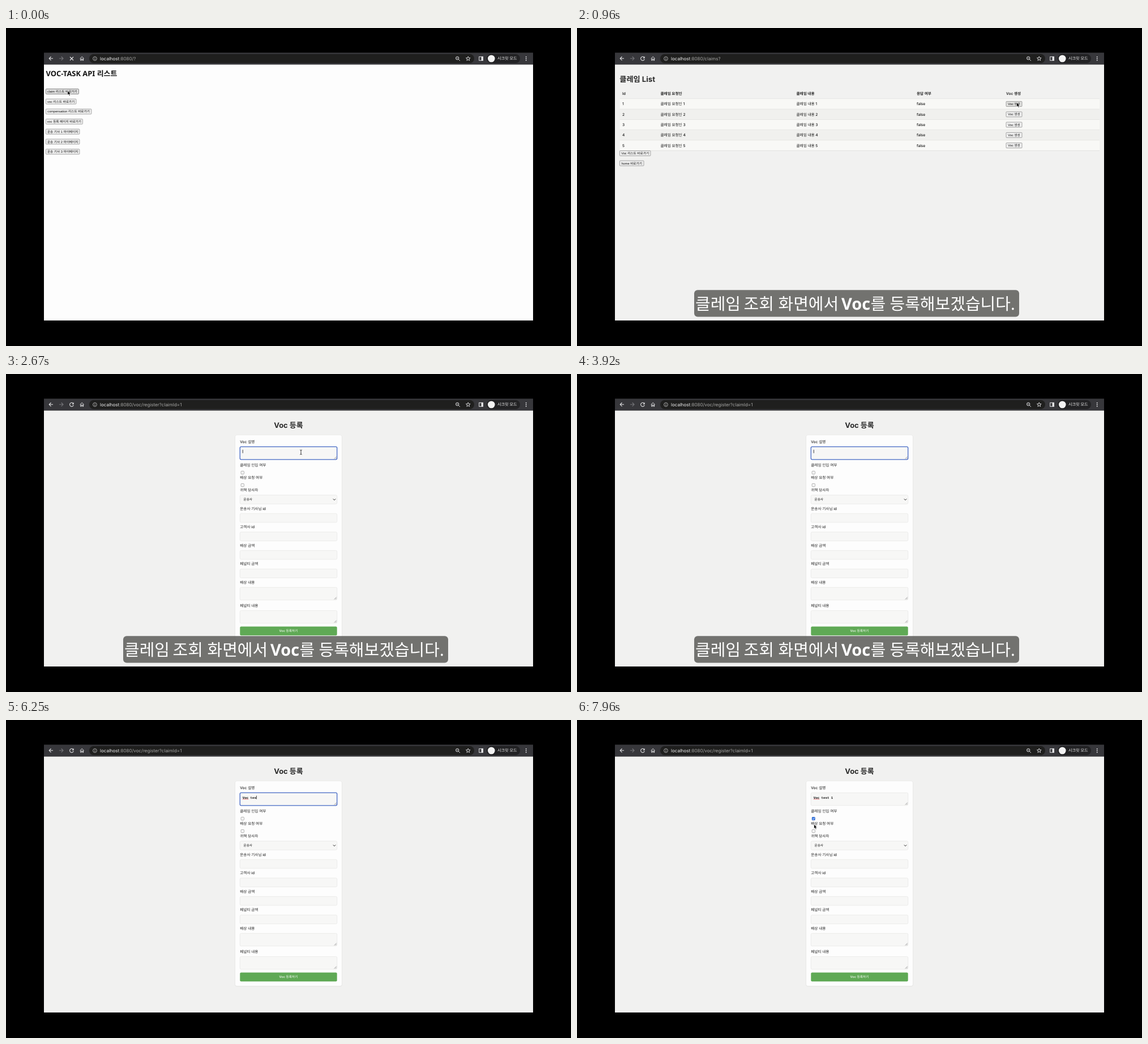
Animation of 998x561 px, one loop 8 s. Source, as an HTML page:

```html
<!DOCTYPE html>
<html lang="ko">
<head>
<meta charset="utf-8">
<title>Voc 등록</title>
<style>
  html, body { margin: 0; width: 100%; height: 100%; overflow: hidden; background: #000; }
  svg { display: block; width: 100%; height: 100%; }
  text { font-family: Inter, "Noto Sans CJK KR", "Noto Sans CJK", sans-serif; text-rendering: geometricPrecision; white-space: pre; }
  .mono { font-family: "Liberation Mono", "DejaVu Sans Mono", monospace; }
  .human { font-family: "Noto Sans", "Noto Sans CJK KR", "Noto Sans CJK", sans-serif; }
  .arial { font-family: "Liberation Sans", "Noto Sans CJK KR", "Noto Sans CJK", sans-serif; }
</style>
</head>
<body>
<svg id="stage" viewBox="0 0 998 561"></svg>
<script>
const LOOP = 8000;
const stage = document.getElementById('stage');

function add(parent, tag, attrs, content) {
  const el = document.createElementNS('http://www.w3.org/2000/svg', tag);
  for (const k in attrs) el.setAttribute(k, attrs[k]);
  if (content !== undefined) el.textContent = content;
  parent.appendChild(el);
  return el;
}
const group = (parent = stage) => add(parent, 'g', {});
const rect = (p, x, y, width, height, fill, more) =>
  add(p, 'rect', { x, y, width, height, fill, ...more });
const line = (p, d, stroke, width = 1, more) =>
  add(p, 'path', { d, stroke, 'stroke-width': width, fill: 'none', ...more });
const circle = (p, cx, cy, r, fill, more) => add(p, 'circle', { cx, cy, r, fill, ...more });
// Text is placed by its left edge and vertical centre.
const text = (p, x, cy, str, size, fill = '#222', more) =>
  add(p, 'text', { x, y: cy + size * 0.37, 'font-size': size, fill, ...more }, str);
const show = (el, on) => el.setAttribute('visibility', on ? 'inherit' : 'hidden');

function button(p, x, cy, width, label) {
  const box = rect(p, x, cy - 4.5, width, 9, '#efefef', { stroke: '#858585', 'stroke-width': 0.7, rx: 1 });
  text(p, x + width / 2, cy, label, 5.65, '#111', { class: 'arial', 'text-anchor': 'middle' });
  return box;
}

function buildToolbar() {
  const g = group();
  const ink = '#e4e4e6';
  rect(g, 67, 43.5, 864, 21, '#37373b');
  rect(g, 147, 46, 680, 16, '#1f1f1e', { rx: 8 });
  rect(g, 849, 46, 59, 16, '#222224', { rx: 8 });
  line(g, 'M83 53.8H76.5M79.5 50.5L76.2 53.8L79.5 57.1', ink, 1.1);
  line(g, 'M94 53.8H100.7M97.7 50.5L101 53.8L97.7 57.1', '#77777b', 1.1);
  line(g, 'M130.7 54L134.2 50.6L137.7 54M131.8 53.5V57.2H133.2V54.8H135.2V57.2H136.6V53.5', ink, 1);
  circle(g, 157, 54, 3.4, 'none', { stroke: '#c8c8c8', 'stroke-width': 0.8 });
  line(g, 'M157 53.6V56M157 51.8V52.7', '#c8c8c8', 0.9);
  circle(g, 797.2, 53.2, 2.7, 'none', { stroke: ink, 'stroke-width': 1 });
  line(g, 'M799.2 55.2L802 58M796 53.2H798.4', ink, 0.9);
  const star = [...Array(10).keys()].map(i => {
    const r = i % 2 ? 1.7 : 4, a = i * Math.PI / 5;
    return `${816.3 + r * Math.sin(a)} ${54.1 - r * Math.cos(a)}`;
  });
  line(g, `M${star.join('L')}Z`, ink, 0.9);
  rect(g, 835.7, 50.7, 6.8, 6.6, 'none', { stroke: ink, 'stroke-width': 1 });
  rect(g, 839.5, 50.7, 3, 6.6, ink);
  circle(g, 857.3, 54, 6.3, '#f3f3f3');
  text(g, 868, 53.8, '시크릿 모드', 7.1, '#f2f2f2', { 'font-weight': 500 });
  for (const y of [51, 54, 57]) circle(g, 918.7, y, 0.9, ink);

  const reload = group(g);
  line(reload, 'M118.6 51.7A3.4 3.4 0 1 0 119.3 54.8', ink, 1.1);
  add(reload, 'path', { d: 'M119.7 50V53.4H116.3Z', fill: ink });
  const stop = line(g, 'M113 51L119 57M119 51L113 57', ink, 1.2);

  const address = text(g, 166, 53.7, '', 8, '#f0f0f0');
  add(address, 'tspan', {}, 'localhost');
  const path = add(address, 'tspan', { fill: '#a9a9a7' });
  return { reload, stop, path };
}

function buildHome() {
  const g = group();
  rect(g, 67, 64.5, 864, 451.5, '#fdfdfd');
  text(g, 70.5, 80.7, 'VOC-TASK API 리스트', 12.9, '#111', { class: 'human', 'font-weight': 700 });
  const links = [
    ['claim 리스트 바로가기', 58], ['voc 리스트 바로가기', 53.5],
    ['compensation 리스트 바로가기', 80.5], ['voc 등록 페이지 바로가기', 65],
    ...[1, 2, 3].map(n => [`운송 기사 ${n} 마이페이지`, 59.5]),
  ];
  links.forEach(([label, w], i) => {
    const box = button(g, 70.4, 112 + i * 17.7, w, label);
    if (!i) { box.setAttribute('fill', '#e2e2e2'); box.setAttribute('stroke', '#555'); }
  });
  return g;
}

function buildClaims() {
  const g = group();
  const bold = { 'font-weight': 600 };
  let first;
  rect(g, 67, 64.5, 864, 451.5, '#f1f1f0');
  text(g, 75.3, 90, '클레임 List', 13.2, '#292929', { 'font-weight': 700 });
  [[80, 'Id'], [147.5, '클레임 요청인'], [387.5, '클레임 내용'], [600, '응답 여부'], [758, 'Voc 생성']]
    .forEach(([x, label]) => text(g, x, 116, label, 6.6, '#222', bold));
  line(g, 'M75.5 125H923', '#d9d9d7', 0.7);
  for (let n = 1; n <= 5; n++) {
    const y = 134 + (n - 1) * 18.3;
    rect(g, 75.5, y - 8.8, 847.5, 18, n % 2 ? '#f8f8f6' : '#f0f0ee');
    line(g, `M75.5 ${y + 9.2}H923`, '#d9d9d7', 0.7);
    [[80, n], [147.5, `클레임 요청인 ${n}`], [387.5, `클레임 내용 ${n}`], [600, 'false']]
      .forEach(([x, str]) => text(g, x, y, str, 6.6, '#151515', { 'font-weight': 500 }));
    const box = button(g, 758, y, 28, 'Voc 생성');
    first = first || box;
  }
  button(g, 75.4, 221, 54.5, 'Voc 리스트 바로가기');
  button(g, 75.4, 238.6, 42.6, 'home 바로가기');
  return { g, first };
}

function buildForm() {
  const g = group();
  rect(g, 67, 64.5, 864, 451.5, '#f1f1f0');
  text(g, 499, 90, 'Voc 등록', 13, '#292929', { 'font-weight': 700, 'text-anchor': 'middle' });
  rect(g, 404, 107.5, 190, 363, '#e9e9e7', { rx: 4 });
  rect(g, 405, 108, 188, 361, '#fdfdfd', { rx: 3 });

  const labels = [
    ['Voc 설명', 119.7], ['클레임 인입 여부', 160.5], ['배상 요청 여부', 182.5], ['귀책 당사자', 204.5],
    ['운송사 기사님 id', 237.5], ['고객사 id', 270], ['배상 금액', 302.5], ['페널티 금액', 335],
    ['배상 내용', 367.5], ['페널티 내용', 408.5],
  ];
  for (const [label, y] of labels) text(g, 413.3, y, label, 6.6, '#222', { 'font-weight': 450 });

  const field = (y, h) =>
    rect(g, 413.3, y, 171.4, h, '#f7f7f6', { rx: 2, stroke: '#e6e6e4', 'stroke-width': 0.7 });
  const area = y => {
    const box = field(y, 22.4);
    line(g, `M579.8 ${y + 21.2}L583.8 ${y + 17.2}M582 ${y + 21.2}L583.8 ${y + 19.4}`, '#666', 0.6);
    return box;
  };
  const note = area(128.4);
  [246.2, 278.8, 311.4, 344].forEach(y => field(y, 15.6));
  area(376.4);
  area(417.4);
  field(213.6, 15.6);
  text(g, 419.5, 221.3, '운송사', 5.6, '#111', { 'font-weight': 500 });
  line(g, 'M577.8 220.3L580 222.5L582.2 220.3', '#222', 1);
  const checkbox = y =>
    rect(g, 415.2, y - 2.6, 5.2, 5.2, '#fff', { rx: 1, stroke: '#777', 'stroke-width': 0.6 });
  checkbox(174);
  checkbox(196);
  const tick = group(g);
  rect(tick, 415, 171.3, 5.5, 5.5, '#2c6fe0', { rx: 1 });
  line(tick, 'M416.2 174.1L417.4 175.4L419.4 172.7', '#fff', 0.9);

  rect(g, 413.3, 445.6, 171.4, 15.6, '#5fa955', { rx: 2 });
  text(g, 499, 453.3, 'Voc 등록하기', 5.7, '#fff', { 'font-weight': 500, 'text-anchor': 'middle' });

  const typed = text(g, 417.8, 136.5, '', 5.75, '#111', { class: 'mono', 'font-weight': 700 });
  const spell = line(g, 'M418 139.7H428', '#d8343a', 0.9, { 'stroke-dasharray': '1.2 0.6' });
  const caret = rect(g, 417.8, 133.6, 0.8, 6, '#111');
  return { g, note, tick, typed, spell, caret };
}

function buildSubtitle() {
  const g = group();
  rect(g, 207, 462.2, 574, 47.3, '#5a5a58', { rx: 6, 'fill-opacity': 0.84 });
  const words = [[209, '클레임'], [294.5, '조회'], [355.5, '화면에서'], [467, 'Voc'], [518.5, '를'], [552.5, '등록해보겠습니다.']];
  for (const [x, word] of words) {
    const latin = word === 'Voc';
    text(g, x, 486.3, word, 29, '#fff', { class: 'human', 'font-weight': latin ? 700 : 500 });
  }
  return g;
}

const bar = buildToolbar();
const home = buildHome();
const claims = buildClaims();
const form = buildForm();
const subtitle = buildSubtitle();

const pointer = group();
const arrow = add(pointer, 'path', {
  d: 'M0 0V7.8L1.8 6.2L3 9L4.5 8.4L3.3 5.7H5.7Z', fill: '#000', stroke: '#fff', 'stroke-width': 0.7,
});
const beam = group(pointer);
line(beam, 'M-1.8 -4Q0 -4 0 -3V3Q0 4 1.8 4M1.8 -4Q0 -4 0 -3M0 3Q0 4 -1.8 4', '#222', 0.9);

const T = { claims: 160, subtitle: 400, load: 1200, form: 1400, focus: 2450, hide: 3200, end: 4130, back: 6950, check: 7540 };
const path = [
  [0, 108.8, 110.5], [260, 108.8, 110.5], [860, 776.6, 131.3], [1640, 776.6, 131.3],
  [2300, 521, 138], [6950, 521, 138], [7400, 417.5, 173.5], [7620, 417.5, 173.5], [7900, 418.6, 184],
];
const keys = [4500, 4660, 4850, 5400, 5750, 5950, 6150, 6360, 6520, 6700];
const NOTE = 'Voc test 1';

function pointerAt(t) {
  const i = path.findIndex(p => p[0] > t);
  if (i < 0) return path[path.length - 1].slice(1);
  const [t0, x0, y0] = path[i - 1], [t1, x1, y1] = path[i];
  const u = (t - t0) / (t1 - t0), e = u * u * (3 - 2 * u);
  return [x0 + (x1 - x0) * e, y0 + (y1 - y0) * e];
}

function draw(t) {
  const onForm = t >= T.form, onClaims = t >= T.claims && !onForm;
  show(home, t < T.claims);
  show(claims.g, onClaims);
  show(form.g, onForm);
  show(subtitle, t >= T.subtitle && t < T.end);

  const loading = t < T.claims || (t >= T.load && t < T.form);
  show(bar.stop, loading);
  show(bar.reload, !loading);
  bar.path.textContent = ':8080/' + (onForm ? 'voc/register?claimId=1' : onClaims ? 'claims?' : '?');

  const [x, y] = pointerAt(t);
  const overNote = onForm && x > 413 && x < 585 && y > 128 && y < 151;
  pointer.setAttribute('transform', `translate(${x} ${y})`);
  show(pointer, t < T.hide || t >= T.back);
  show(arrow, !overNote);
  show(beam, overNote);
  claims.first.setAttribute('fill', x > 758 ? '#dfdfdd' : '#efefef');

  const count = keys.filter(k => k <= t).length;
  const focused = t >= T.focus && t < T.check;
  const since = t - (count ? keys[count - 1] : T.focus);
  form.typed.textContent = NOTE.slice(0, count);
  form.caret.setAttribute('x', 417.8 + count * 3.45);
  show(form.caret, focused && since % 1000 < 500);
  show(form.spell, count > 3);
  show(form.tick, t >= T.check);
  form.note.setAttribute('stroke', focused ? '#4468c4' : '#e6e6e4');
  form.note.setAttribute('stroke-width', focused ? 1.3 : 0.7);
}

function tick() {
  draw(performance.now() % LOOP);
  requestAnimationFrame(tick);
}
tick();
</script>
</body>
</html>
```
